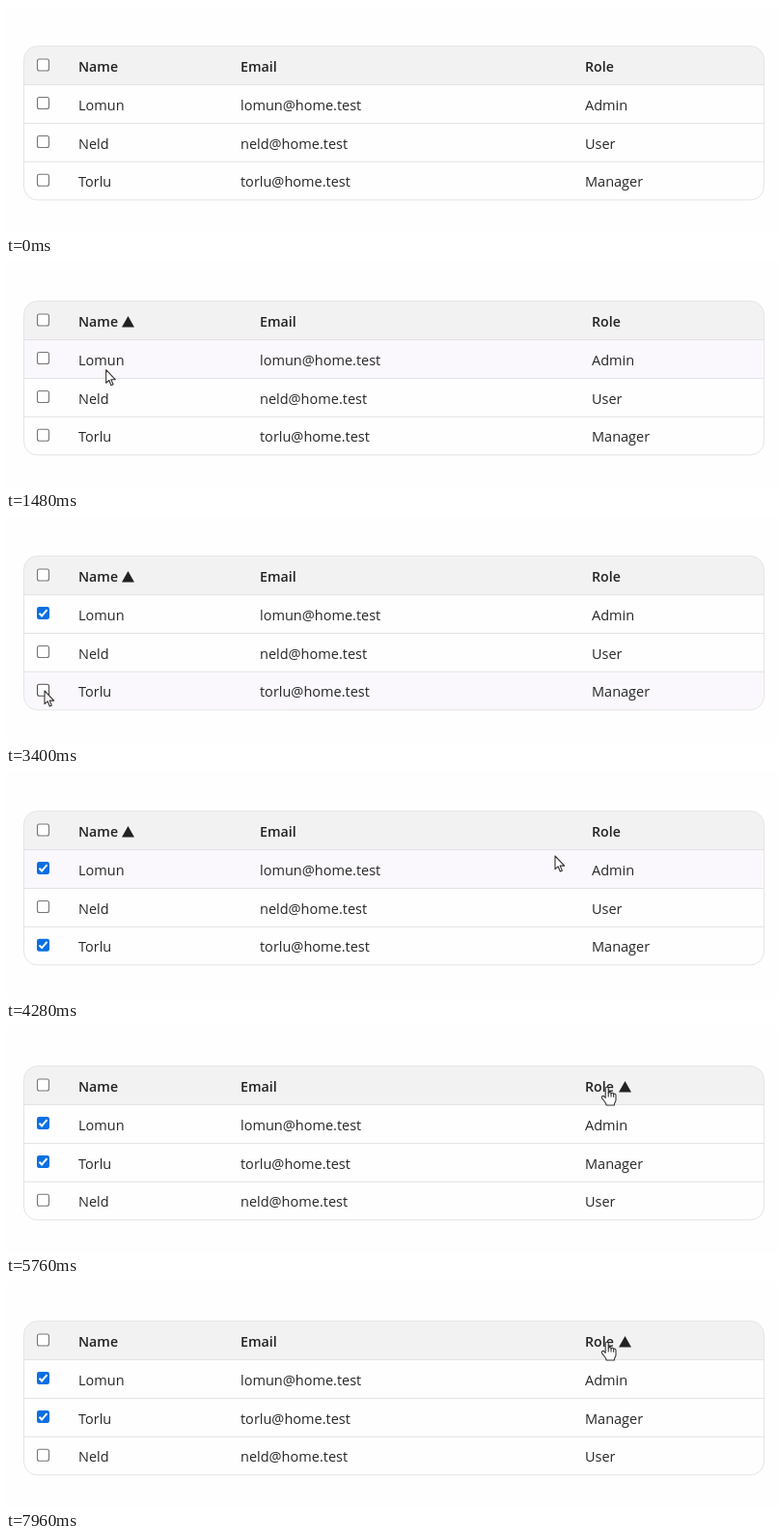
An HTML page with a canvas that plays this animation: 800 px wide and 235 px high, repeating every 8 s.

```html
<!DOCTYPE html>
<html lang="en">
<head>
<meta charset="utf-8">
<title>Sortable table</title>
<style>
  html, body { margin: 0; width: 100%; height: 100%; overflow: hidden; background: #fefefe; }
  canvas { display: block; width: 800px; height: 235px; }
</style>
</head>
<body>
<canvas id="stage"></canvas>
<script>
const W = 800, H = 235, LOOP = 8000;
const canvas = document.getElementById('stage');
const ctx = canvas.getContext('2d');
const dpr = window.devicePixelRatio || 1;
canvas.width = W * dpr;
canvas.height = H * dpr;

const TABLE = { left: 18.5, top: 41.5, right: 785.5, bottom: 200.8, radius: 14 };
const LINES = [81.5, 121.5, 161.2];
const BASELINES = [68, 108, 147.5, 187.3];
const BOX_Y = [61, 100.5, 140.5, 180.2];
const BOX_X = 38.5;
const FONT = '"Open Sans", "Noto Sans", sans-serif';

const people = [
  { name: 'Lomun', email: 'lomun@home.test', role: 'Admin', checkedAt: 2600 },
  { name: 'Neld', email: 'neld@home.test', role: 'User', checkedAt: Infinity },
  { name: 'Torlu', email: 'torlu@home.test', role: 'Manager', checkedAt: 3480 }
];

// Sort clicks: start time, column, direction
const sorts = [
  { at: 0, key: '', dir: 1 },
  { at: 1080, key: 'name', dir: 1 },
  { at: 5280, key: 'role', dir: 1 },
  { at: 6320, key: 'role', dir: -1 },
  { at: 7780, key: 'role', dir: 1 }
];

// Pointer stops: time, x, y
const stops = [
  [120, 185, 240], [720, 103, 63.4], [1320, 103, 63.4],
  [1720, 105, 202], [1840, 105, 202], [2240, 27, 115],
  [2480, 38, 103], [2800, 38, 103], [3240, 40, 181],
  [3560, 40, 181], [3720, 45, 188], [4280, 569, 88],
  [4600, 623, 63.4]
];

const ARROW = new Path2D('M0 0V13.6L3.1 10.8L5.3 16L7.4 15.1L5.2 10.1H9.7Z');
const HAND = new Path2D(
  'M-1.8 11V1.3C-1.8 -.6 1.2 -.6 1.2 1.3V6.2C1.5 4.7 4 5 4 6.6' +
  'C4.4 5.4 6.6 5.7 6.6 7.2C7.1 6.3 9 6.7 9 8.3V13C9 15 7.3 16 7.3 18.6' +
  'H-.8C-.8 16.5 -3.1 14.4 -5.3 11.4C-6.6 9.5 -4.1 8.3 -3 9.7Z');
const KNUCKLES = new Path2D('M1.2 6V10M4 6.6V10M6.6 7.2V10.3');

function pointer(t) {
  if (t < stops[0][0]) return null;
  const i = stops.findIndex(s => s[0] > t);
  if (i < 0) {
    const [, x, y] = stops[stops.length - 1];
    return { x, y };
  }
  const [t0, x0, y0] = stops[i - 1], [t1, x1, y1] = stops[i];
  const p = (t - t0) / (t1 - t0);
  const e = p * p * (3 - 2 * p);
  return { x: x0 + (x1 - x0) * e, y: y0 + (y1 - y0) * e };
}

function rowAt(p) {
  if (!p || p.x < TABLE.left || p.x > TABLE.right) return -1;
  if (p.y < TABLE.top || p.y >= TABLE.bottom) return -1;
  return LINES.filter(y => p.y >= y).length;
}

function sorted(sort) {
  if (!sort.key) return people;
  return [...people].sort((a, b) =>
    sort.dir * a[sort.key].localeCompare(b[sort.key]));
}

function text(str, x, y, bold) {
  ctx.font = bold ? `600 14.2px ${FONT}` : `400 14.5px ${FONT}`;
  ctx.fillStyle = bold ? '#222' : '#262626';
  ctx.fillText(str, x, y);
}

function roundBox(x, y, w, h, r) {
  ctx.beginPath();
  ctx.roundRect(x, y, w, h, r);
}

function checkbox(y, checked, hover) {
  const x = BOX_X;
  if (checked) {
    roundBox(x - 6.5, y - 6.5, 13, 13, 2.3);
    ctx.fillStyle = '#0b6fe3';
    ctx.fill();
    ctx.beginPath();
    ctx.moveTo(x - 4, y + 0.2);
    ctx.lineTo(x - 1.4, y + 2.9);
    ctx.lineTo(x + 4, y - 3.3);
    ctx.strokeStyle = '#fff';
    ctx.lineWidth = 2;
    ctx.stroke();
    return;
  }
  roundBox(x - 6, y - 6, 12, 12, 2);
  ctx.fillStyle = '#fff';
  ctx.fill();
  ctx.strokeStyle = hover ? '#4f4f4f' : '#767676';
  ctx.lineWidth = 1.1;
  ctx.stroke();
}

function triangle(x, dir) {
  const base = dir > 0 ? 68.5 : 57, tip = dir > 0 ? 57 : 68.5;
  ctx.beginPath();
  ctx.moveTo(x, base);
  ctx.lineTo(x + 13, base);
  ctx.lineTo(x + 6.5, tip);
  ctx.fillStyle = '#222';
  ctx.fill();
}

function drawTable(t, p) {
  const { left, top, right, bottom, radius } = TABLE;
  const sort = sorts.filter(s => s.at <= t).pop();
  const wide = sort.key === 'name';
  const cols = { name: 75, email: wide ? 263 : 243, role: wide ? 607 : 600 };
  const hover = rowAt(p);
  const overBox = y => p && Math.abs(p.x - BOX_X) < 7 && Math.abs(p.y - y) < 7;

  ctx.save();
  roundBox(left, top, right - left, bottom - top, radius);
  ctx.clip();
  ctx.fillStyle = '#f2f2f2';
  ctx.fillRect(left, top, right - left, LINES[0] - top);
  if (hover > 0) {
    const y = LINES[hover - 1];
    ctx.fillStyle = '#faf8fc';
    ctx.fillRect(left, y, right - left, (LINES[hover] || bottom) - y);
  }
  ctx.strokeStyle = '#e3e2e6';
  ctx.lineWidth = 1;
  for (const y of LINES) {
    ctx.beginPath();
    ctx.moveTo(left, y);
    ctx.lineTo(right, y);
    ctx.stroke();
  }
  ctx.restore();
  roundBox(left, top, right - left, bottom - top, radius);
  ctx.strokeStyle = '#e5e5e7';
  ctx.lineWidth = 1;
  ctx.stroke();

  checkbox(BOX_Y[0], false, overBox(BOX_Y[0]));
  text('Name', cols.name, BASELINES[0], true);
  text('Email', cols.email, BASELINES[0], true);
  text('Role', cols.role, BASELINES[0], true);
  if (sort.key) triangle(wide ? 120 : 635, sort.dir);

  sorted(sort).forEach((person, i) => {
    const y = BOX_Y[i + 1];
    checkbox(y, t >= person.checkedAt, overBox(y));
    for (const key in cols) text(person[key], cols[key], BASELINES[i + 1]);
  });
}

function drawPointer(p) {
  if (!p) return;
  const hand = rowAt(p) === 0;
  const shape = hand ? HAND : ARROW;
  ctx.save();
  ctx.translate(p.x, p.y);
  ctx.fillStyle = '#fff';
  ctx.strokeStyle = '#333';
  ctx.lineWidth = 1.1;
  ctx.lineJoin = 'round';
  ctx.fill(shape);
  ctx.stroke(shape);
  if (hand) ctx.stroke(KNUCKLES);
  ctx.restore();
}

function frame(now) {
  const t = now % LOOP;
  const p = pointer(t);
  ctx.setTransform(dpr, 0, 0, dpr, 0, 0);
  ctx.fillStyle = '#fefefe';
  ctx.fillRect(0, 0, W, H);
  drawTable(t, p);
  drawPointer(p);
  requestAnimationFrame(frame);
}

requestAnimationFrame(frame);
</script>
</body>
</html>
```
